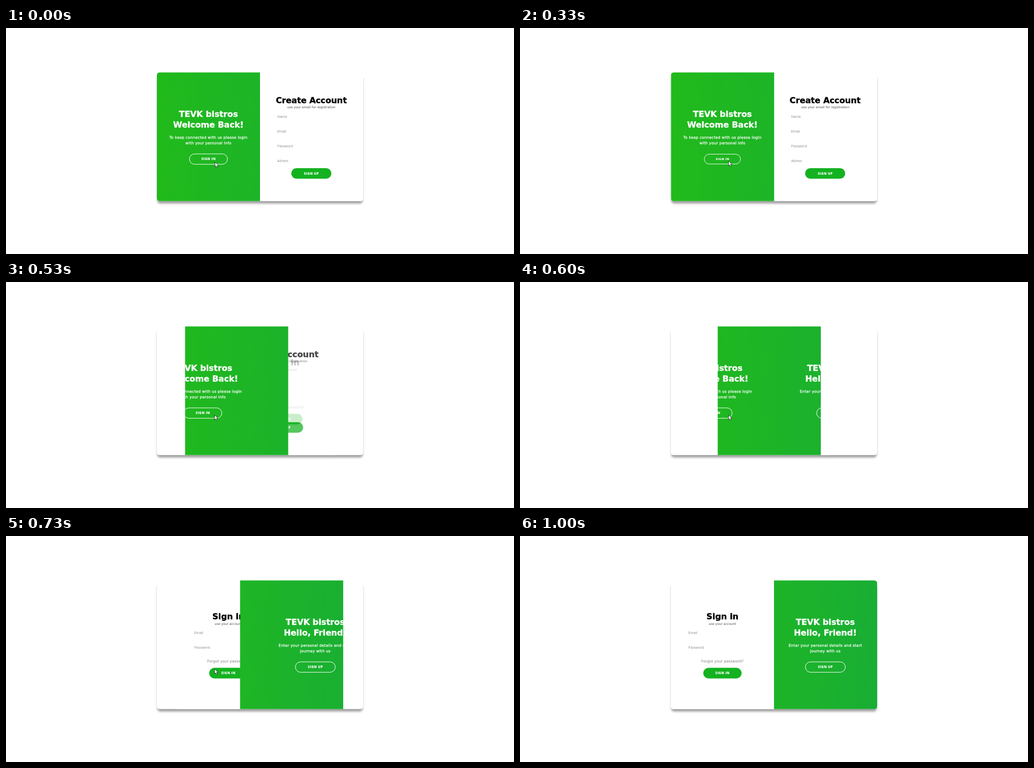
An HTML page for the animation above (2000 ms loop, 1000 px wide and 445 px high).

```html
<!DOCTYPE html>
<html lang="en">
<head>
<meta charset="utf-8">
<title>Sign in / sign up slider</title>
<style>
  html, body { margin: 0; width: 100%; height: 100%; overflow: hidden; background: #fff; }
  svg { display: block; width: 1000px; height: 445px; }
  text { font-family: "DejaVu Sans", Verdana, sans-serif; text-anchor: middle; }
  .title { font-size: 16.2px; font-weight: 700; stroke: #000; stroke-width: .4px; }
  .panel .title { stroke: #fff; }
  .lead { font-size: 7.35px; letter-spacing: .26px; stroke: #fff; stroke-width: .25px; }
  .note { font-size: 6.25px; fill: #4a4a4a; }
  .link { font-size: 7.35px; fill: #808080; }
  .field { font-family: "Open Sans", "Noto Sans", sans-serif; font-size: 6.9px; fill: #858a90; text-anchor: start; }
  .label { font-family: "Open Sans", "Noto Sans", sans-serif; font-size: 6.3px; font-weight: 800; letter-spacing: .5px; fill: #fff; }
  .solid { fill: #14b220; }
  .ghost { fill: none; stroke: #fff; stroke-width: 1px; }
</style>
</head>
<body>
<svg viewBox="0 0 1000 445">
  <defs>
    <linearGradient id="green">
      <stop offset="0" stop-color="#21ba1b"/>
      <stop offset="1" stop-color="#19ae34"/>
    </linearGradient>
    <filter id="soft" x="-10%" y="-10%" width="120%" height="120%"><feGaussianBlur stdDeviation="2.2"/></filter>
    <clipPath id="card"><rect x="297" y="87.5" width="406" height="253.2" rx="5.3"/></clipPath>
    <clipPath id="window"><rect id="pane" x="297" y="87" width="203" height="255"/></clipPath>
  </defs>

  <rect x="298" y="96" width="404" height="249.5" rx="5" opacity=".38" filter="url(#soft)"/>
  <rect x="297" y="87.5" width="406" height="253.2" rx="5.3" fill="#fff"/>

  <g clip-path="url(#card)">
    <g id="forms">
      <g id="signIn">
        <rect x="297" y="87" width="203" height="255" fill="#fff"/>
        <text class="title" x="398.5" y="164">Sign in</text>
        <text class="note" x="398.5" y="174.5">use your account</text>
        <text class="field" x="331.5" y="192.8">Email</text>
        <text class="field" x="331.5" y="221.8">Password</text>
        <text class="link" x="398.5" y="249.3">Forgot your password?</text>
        <rect class="solid" x="360.7" y="259.6" width="75.6" height="20.8" rx="10.4"/>
        <text class="label" x="398.7" y="272.3">SIGN IN</text>
      </g>
      <g id="signUp">
        <rect x="500" y="87" width="203" height="255" fill="#fff"/>
        <text class="title" x="601" y="148">Create Account</text>
        <text class="note" x="601" y="158">use your email for registration</text>
        <text class="field" x="534" y="176.8">Name</text>
        <text class="field" x="534" y="205.8">Email</text>
        <text class="field" x="534" y="234.7">Password</text>
        <text class="field" x="534" y="263.7">Adress</text>
        <rect class="solid" x="561.5" y="276" width="79" height="20.8" rx="10.4"/>
        <text class="label" x="601.3" y="288.7">SIGN UP</text>
      </g>
    </g>

    <g class="panel" clip-path="url(#window)" fill="#fff">
      <rect x="297" y="87" width="406" height="255" fill="url(#green)"/>
      <g id="welcome">
        <text class="title" x="398.5" y="175.3">TEVK bistros</text>
        <text class="title" x="398.5" y="195.6">Welcome Back!</text>
        <text class="lead" x="398.5" y="218.4">To keep connected with us please login</text>
        <text class="lead" x="398.5" y="229">with your personal info</text>
        <g id="press">
          <rect class="ghost" x="361" y="247.9" width="75" height="20.4" rx="10.2"/>
          <text class="label" x="398.8" y="260.3">SIGN IN</text>
        </g>
      </g>
      <g id="hello">
        <text class="title" x="601" y="175.3">TEVK bistros</text>
        <text class="title" x="601" y="195.6">Hello, Friend!</text>
        <text class="lead" x="601" y="218.4">Enter your personal details and start</text>
        <text class="lead" x="601" y="229">journey with us</text>
        <rect class="ghost" x="561.8" y="247.9" width="78.6" height="20.4" rx="10.2"/>
        <text class="label" x="601.3" y="260.3">SIGN UP</text>
      </g>
    </g>
  </g>

  <g id="cursor">
    <path id="arrow" d="M0 0V9.6L2.2 7.6 3.7 11 5.4 10.3 3.9 7H6.8Z" fill="#fff" stroke="#222" stroke-width=".8"/>
    <path id="beam" d="M-1.5-4.5H1.5M0-4.5V4.5M-1.5 4.5H1.5" fill="none" stroke="#777" stroke-width=".8"/>
  </g>
</svg>
<script>
  const $ = id => document.getElementById(id);
  const LOOP = 2000, STEP = 200 / 3, LAST = 15;
  const SLIDE_START = 316, SLIDE_TIME = 600, HALF = 203, DRIFT = HALF * .2;

  // time, x, y
  const track = [
    [0, 411.5, 264], [270, 410.5, 261.7], [735, 410.5, 261.7],
    [800, 430, 240], [867, 498, 172.5], [934, 600, 4]
  ];

  const clamp = v => Math.min(1, Math.max(0, v));
  const shift = (id, x) => $(id).setAttribute("transform", `translate(${x} 0)`);

  // cubic-bezier(.42, 0, .58, 1)
  function easeInOut(x) {
    let lo = 0, hi = 1;
    for (let i = 0; i < 24; i++) {
      const u = (lo + hi) / 2, v = 1 - u;
      if (1.26 * u * v * v + 1.74 * u * u * v + u * u * u < x) lo = u; else hi = u;
    }
    return lo * lo * (3 - 2 * lo);
  }

  function pointer(t) {
    const i = Math.max(1, track.findIndex(k => k[0] >= t));
    const [a, b] = [track[i - 1], track[i]];
    const f = clamp((t - a[0]) / (b[0] - a[0]));
    return [a[1] + (b[1] - a[1]) * f, a[2] + (b[2] - a[2]) * f];
  }

  // the picture advances at 15 steps a second, on whole 10 ms ticks
  function stepAt(t) {
    let n = 0;
    while (n < LAST && Math.round((n + 1) * STEP / 10) * 10 <= t) n++;
    return n;
  }

  let shown = -1;
  function draw(n) {
    const t = n * STEP;
    const p = easeInOut(clamp((t - SLIDE_START) / SLIDE_TIME));

    $("pane").setAttribute("x", 297 + HALF * p);
    shift("welcome", -DRIFT * p);
    shift("hello", DRIFT * (1 - p));
    shift("signIn", HALF * (1 - p));
    shift("signUp", -HALF * p);
    $("signIn").setAttribute("opacity", clamp(p * 3));
    $("signUp").setAttribute("opacity", 1 - p);
    $("forms").append($(p > .625 ? "signIn" : "signUp"));

    const down = clamp((t - 230) / 80) * clamp((420 - t) / 80);
    $("press").setAttribute("transform",
      `translate(398.5 258.1) scale(${1 - .05 * down}) translate(-398.5 -258.1)`);

    const overText = n === 13;
    $("cursor").setAttribute("visibility", n < LAST ? "visible" : "hidden");
    $("cursor").setAttribute("transform", `translate(${pointer(Math.min(t, 934))})`);
    $("arrow").setAttribute("display", overText ? "none" : "inline");
    $("beam").setAttribute("display", overText ? "inline" : "none");
  }

  const start = performance.now();
  function tick() {
    const n = stepAt((performance.now() - start) % LOOP);
    if (n !== shown) draw(shown = n);
    requestAnimationFrame(tick);
  }
  tick();
</script>
</body>
</html>
```
